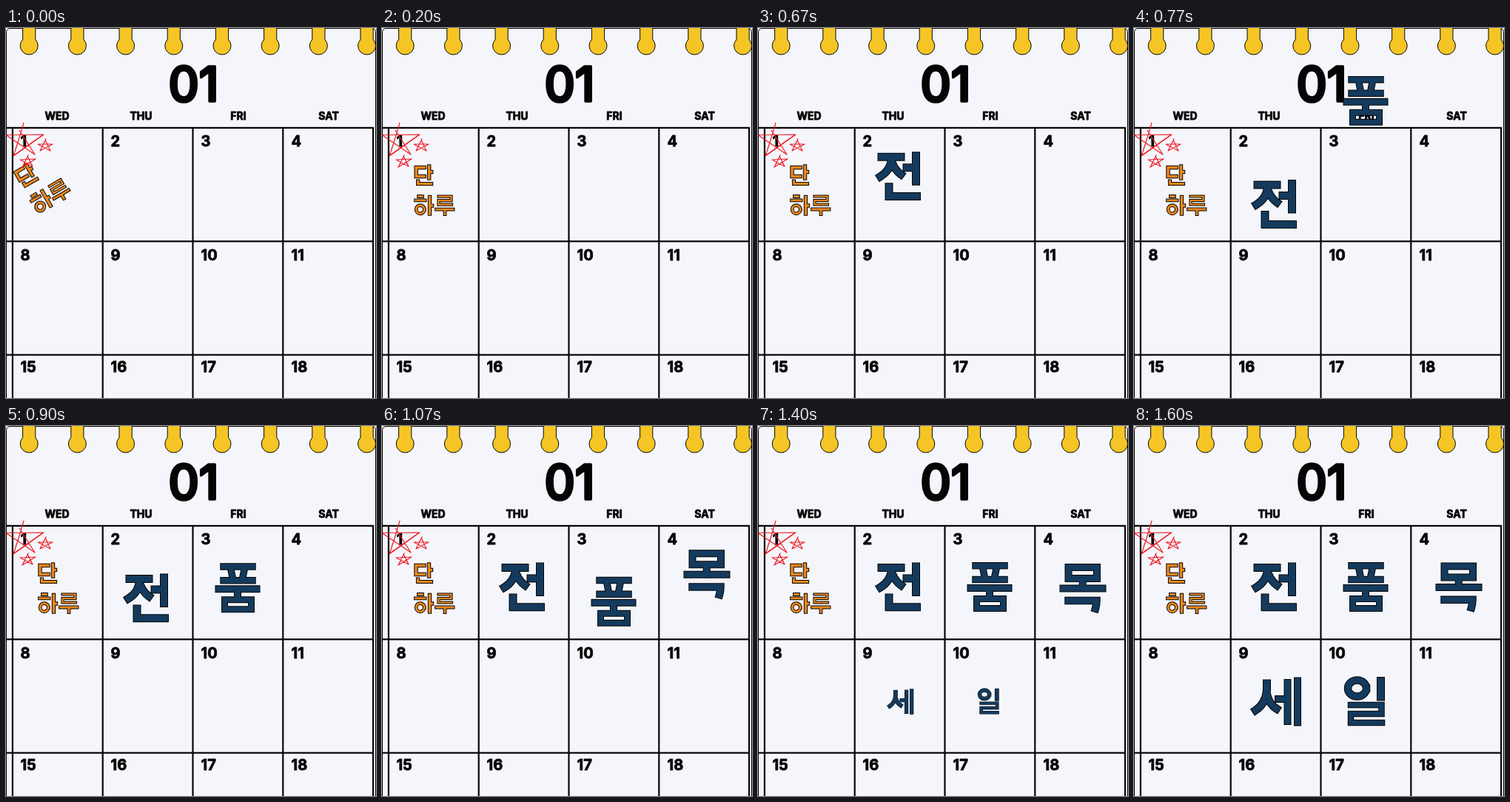
An HTML page with a canvas for the animation above (2060 ms loop, 500 by 500 pixels).

```html
<!DOCTYPE html>
<html lang="ko">
<head>
<meta charset="utf-8">
<title>단 하루 전품목 세일</title>
<style>
  html, body { margin: 0; width: 100%; height: 100%; overflow: hidden; background: #f5f6fc; }
  canvas { display: block; width: 500px; height: 500px; }
</style>
</head>
<body>
<canvas id="stage" width="500" height="500" role="img" aria-label="01 단 하루 전품목 세일"></canvas>
<script>
const ctx = document.getElementById('stage').getContext('2d');
const LOOP = 2060;
const STEP = 100 / 3;
const MOVE = 16 * STEP;
const PAPER = '#f5f6fc', INK = '#050505', NAVY = '#143a5d', ORANGE = '#ee871b', RED = '#ee1c25', YELLOW = '#f5c525';
const FONT = 'Inter, "Open Sans", sans-serif';

// Each lettering stroke is [width, skeleton path].
const shape = strokes => strokes.map(([width, d]) => ({ width, path: new Path2D(d) }));

const oneDay = shape([
  [5.4, 'M57 188.5H46V200.5H57 M63.5 187V203 M63.5 194.5H66.5'],
  [5.2, 'M48.5 207V210.5H66.5'],
  [4.8, 'M49.5 227.5H54.5 M45.5 232.8H58'],
  [4.8, 'M57.3 245.2A5.6 5.6 0 1 1 46.1 245.2A5.6 5.6 0 1 1 57.3 245.2'],
  [5.4, 'M64.5 228.5V251 M64.5 240H67.5'],
  [4.2, 'M76.5 227.5H93.5V233H76.5V238.5H94'],
  [4.8, 'M73.5 245H96 M85 246V251.5']
]);

const falling = [
  shape([
    [11, 'M167 191.5H193 M180.5 193Q180 209 165.5 218 M182 201Q186 210 193 215'],
    [11, 'M213.5 190V224.5 M201 206H213 M177 232V244.8H214.5']
  ]),
  shape([
    [9.5, 'M294 188.8H333 M304 193L306 203 M322 193L320 203 M294 207.5H333'],
    [10, 'M287.5 219H338.5 M313 220V231'],
    [9, 'M295.5 233.5H331.5V246.5H295.5Z']
  ]),
  shape([
    [10, 'M419.5 189.5H458V204.5H419.5Z M438.7 205.5V217.5'],
    [10, 'M412.5 218H465.5'],
    [10.5, 'M419.5 234.7H457.5Q457.5 240 456 245.3']
  ])
];

const growing = [
  { x: 193, y: 372.5, glyph: shape([
    [11, 'M179.5 348V357Q178 375 164.5 384 M180 364Q183 376 192.5 382'],
    [10, 'M195 369H207 M207.5 347V399 M221 344.5V400.5']
  ]) },
  { x: 311, y: 372, glyph: shape([
    [10.5, 'M314 354.5A12.5 11 0 1 1 289 354.5A12.5 11 0 1 1 314 354.5'],
    [11, 'M333.5 344.5V366'],
    [8.5, 'M293 377H334.5V389H293V401H335']
  ]) }
];

const stars = new Path2D(
  'M24 128Q19 146 10 173L51 144L0 144.5L39 171L18 138 M12 171L49 145' +
  'M54 150L46 166L63 157L43 157L60 166L53 151' +
  'M30 172L22 188L40 177L19 178L36 187L29 173'
);

const backOut = p => 1 + 2.70158 * (p - 1) ** 3 + 1.70158 * (p - 1) ** 2;
const clamp = p => Math.max(0, Math.min(1, p));

function letter(glyph, color) {
  ctx.lineCap = 'square';
  ctx.lineJoin = 'miter';
  for (const [style, inset] of [[INK, 0], [color, 2]]) {
    ctx.strokeStyle = style;
    for (const { width, path } of glyph) {
      ctx.lineWidth = width - inset;
      ctx.stroke(path);
    }
  }
}

function label(text, x, y, weight, size, outline, align = 'left') {
  ctx.font = `${weight} ${size}px ${FONT}`;
  ctx.textAlign = align;
  ctx.lineJoin = 'round';
  ctx.lineWidth = outline;
  ctx.fillStyle = ctx.strokeStyle = INK;
  ctx.fillText(text, x, y);
  ctx.strokeText(text, x, y);
}

function ring(x) {
  const half = 8.6, r = 12, cy = 24;
  const a = Math.acos(half / r);
  ctx.beginPath();
  ctx.moveTo(x + half, 0);
  ctx.arc(x, cy, r, -a, Math.PI + a);
  ctx.lineTo(x - half, 0);
  ctx.fillStyle = YELLOW;
  ctx.fill();
  ctx.strokeStyle = INK;
  ctx.lineWidth = 1;
  ctx.stroke();
}

function calendar() {
  ctx.fillStyle = PAPER;
  ctx.fillRect(0, 0, 500, 500);
  ctx.strokeStyle = INK;
  ctx.lineWidth = 1;
  ctx.beginPath();
  ctx.roundRect(0.5, 0.5, 499, 520, 5);
  ctx.stroke();
  for (let i = 0; i < 8; i++) ring(31.2 + i * 65.2);

  ctx.fillStyle = INK;
  for (let i = 0; i < 3; i++) ctx.fillRect(0, 133.8 + i * 153.4, 497, 2.2);
  for (let i = 0; i < 5; i++) ctx.fillRect(7.8 + i * 121.8, 134, 2.2, 366);

  label('01', 219.5, 98.8, 500, 64, 3.6);
  [['WED', 69], ['THU', 182.5], ['FRI', 314], ['SAT', 436]]
    .forEach(([day, x]) => label(day, x, 123.8, 700, 14, 0.8, 'center'));
  [160.3, 314.3, 464.8].forEach((y, row) => {
    for (let col = 0; col < 4; col++) {
      label(String(1 + row * 7 + col), 19.6 + col * 122, y, 700, 20, 0.8);
    }
  });
}

function draw(time) {
  calendar();

  ctx.save();
  ctx.translate(42, 253.5);
  ctx.rotate(-Math.PI / 6 * (1 - backOut(clamp(time / MOVE))));
  ctx.translate(-42, -253.5);
  letter(oneDay, ORANGE);
  ctx.restore();

  ctx.lineCap = ctx.lineJoin = 'round';
  ctx.strokeStyle = RED;
  ctx.lineWidth = 1.2;
  ctx.stroke(stars);

  falling.forEach((glyph, i) => {
    const p = clamp((time - 500 - i * 200) / MOVE);
    if (p < 0.001) return;
    ctx.save();
    ctx.translate(0, 235 * (backOut(p) - 1));
    letter(glyph, NAVY);
    ctx.restore();
  });

  const scale = clamp((time - 1180) / 420);
  if (scale === 0) return;
  for (const { x, y, glyph } of growing) {
    ctx.save();
    ctx.translate(x, y);
    ctx.scale(scale, scale);
    ctx.translate(-x, -y);
    letter(glyph, NAVY);
    ctx.restore();
  }
}

// Motion advances in thirtieths of a second.
function tick() {
  const t = performance.now() % LOOP;
  draw(Math.floor((t + 3.4) / STEP) * STEP);
  requestAnimationFrame(tick);
}
tick();
</script>
</body>
</html>
```
